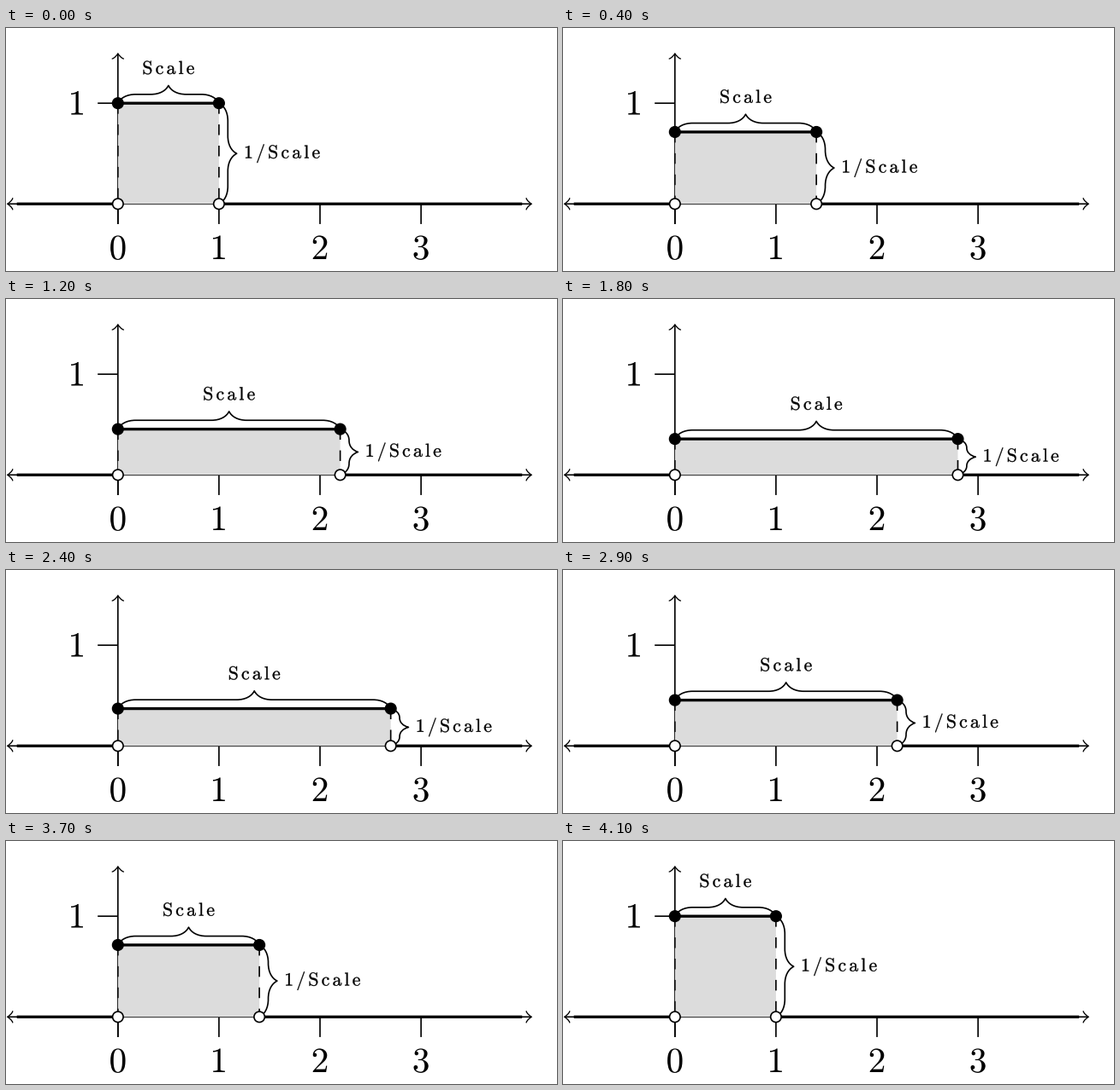
Write a matplotlib script that moves like this. It is 644 by 285 pixels and loops after 4200 ms.

```python
import matplotlib.pyplot as plt
import numpy as np
from matplotlib.animation import FuncAnimation
from matplotlib.patches import Circle, PathPatch, Rectangle
from matplotlib.path import Path
from matplotlib.textpath import TextPath
from matplotlib.transforms import Affine2D

plt.rcParams["mathtext.fontset"] = "cm"

W, H, DPI = 644, 285, 100
UNIT = 118.1                  # pixels per axis unit
PT = UNIT / 28.45             # pixels per typographic point
OX, OY = 130.8, H - 206.3     # origin, y pointing up
THIN, THICK = 0.4 * PT, 0.8 * PT
TICK = 0.2 * UNIT
AMP = 5 * PT                  # brace amplitude
STEPS = 21
FRAMES = 2 * STEPS

fig = plt.figure(figsize=(W / DPI, H / DPI), dpi=DPI, facecolor="white")
ax = fig.add_axes([0, 0, 1, 1])
ax.set_xlim(0, W)
ax.set_ylim(0, H)
ax.axis("off")


def px(width):
    """Line width in pixels to points."""
    return width * 72 / DPI


def line(xs, ys, width=THIN, z=1, **kw):
    kw.setdefault("solid_capstyle", "butt")
    return ax.plot(xs, ys, color="black", lw=px(width), zorder=z,
                   snap=False, **kw)[0]


def stroke(path, width=THIN, z=1):
    patch = PathPatch(path, fc="none", ec="black", lw=px(width), zorder=z,
                      capstyle="round", joinstyle="round", snap=False)
    return ax.add_patch(patch)


def arrow_tip(x, y, angle):
    pts = np.array([(-3, 4), (-2.75, 2.5), (0, 0.25), (0.75, 0),
                    (0, -0.25), (-2.75, -2.5), (-3, -4)], float)
    pts = (pts - (1.15, 0)) * 0.4 * PT
    path = Path(pts, [Path.MOVETO] + [Path.CURVE4] * 6)
    stroke(Affine2D().rotate_deg(angle).translate(x, y).transform_path(path),
           0.8 * THIN)


def label(text, size, center=True, weight=0.0, z=6):
    """Roman text with its baseline at y = 0, centred or left aligned on x = 0."""
    path = TextPath((0, 0), r"$\mathrm{%s}$" % text, size=size)
    box = path.get_extents()
    shift = -(box.x0 + box.x1) / 2 if center else -box.x0
    path = Affine2D().translate(shift, 0).transform_path(path)
    return ax.add_patch(PathPatch(path, fc="black", ec="black", lw=px(weight),
                                  zorder=z, snap=False))


def move(patch, x, y):
    patch.set_transform(Affine2D().translate(x, y) + ax.transData)


def tracked(word):
    return r"\hspace{0.165}".join(word)


def brace(length):
    """Points (along, out) of a curly brace and their path codes."""
    k = min(AMP, length / 4)
    mid = length / 2
    half = [(0, 0), (0.15 * k, 0.3), (0.5 * k, 0.5), (k, 0.5),
            (mid - k, 0.5), (mid - 0.5 * k, 0.5), (mid - 0.15 * k, 0.7),
            (mid, 1)]
    other = [(length - a, out) for a, out in half[-2::-1]]
    pts = np.array(half + other) * (1, AMP)
    c, l = [Path.CURVE4] * 3, [Path.LINETO]
    return pts, [Path.MOVETO] + c + l + c + c + l + c


# axes, ticks and numbers
left, right, top = OX - 1.1 * UNIT, OX + 4.1 * UNIT, OY + 1.5 * UNIT
line([left + 1.5, right - 1.5], [OY, OY])
line([OX, OX], [OY - TICK, top - 1.5])
arrow_tip(left, OY, 180)
arrow_tip(right, OY, 0)
arrow_tip(OX, top, 90)
for n in range(4):
    tick_x = OX + n * UNIT
    line([tick_x, tick_x], [OY, OY - TICK])
    move(label(str(n), 10 * PT), tick_x, H - 271.2)
line([OX - TICK, OX], [OY + UNIT, OY + UNIT])
move(label("1", 10 * PT), 83, H - 101.7)
line([OX - UNIT, OX], [OY, OY], THICK, 3)

# moving parts
area = ax.add_patch(Rectangle((OX, OY), UNIT, UNIT, fc="#dcdcdc", lw=0,
                              zorder=2, snap=False))
axis_rest = line([], [], THICK, 3)
dash = dict(ls=(0, (7.5, 7.5)), dash_capstyle="butt")
sides = [line([], [], THIN, 3, **dash) for _ in range(2)]
roof = line([], [], THICK, 4)
empty = Path(np.zeros((1, 2)))
top_brace, side_brace = stroke(empty, z=4), stroke(empty, z=4)
dots = [ax.add_patch(Circle((OX, OY), 1.5 * PT, fc=fill, ec="black",
                            lw=px(THIN), zorder=5, snap=False))
        for fill in ("white", "white", "black", "black")]
top_label = label(tracked("Scale"), 21.8, weight=0.35)
side_label = label(tracked("1/Scale"), 21.8, center=False, weight=0.35)


def update(i):
    scale = 1 + 0.1 * min(i, FRAMES - 1 - i)
    w, h = UNIT * scale, UNIT / scale
    x, y = OX + w, OY + h

    area.set_width(w)
    area.set_height(h)
    axis_rest.set_data([x, OX + 4 * UNIT], [OY, OY])
    roof.set_data([OX, x], [y, y])
    for side, sx in zip(sides, (OX, x)):
        side.set_data([sx, sx], [y, OY])
    for dot, center in zip(dots, ((OX, OY), (x, OY), (OX, y), (x, y))):
        dot.set_center(center)

    pts, codes = brace(w)
    top_brace.set_path(Path(pts + (OX, y), codes))
    pts, codes = brace(h)
    side_brace.set_path(Path(pts[:, ::-1] * (1, -1) + (x, y), codes))

    move(top_label, OX + w / 2 + 0.3, y + 34.2)
    move(side_label, x + 31, OY + h / 2 - 5.4)
    return []


anim = FuncAnimation(fig, update, frames=FRAMES, interval=100,
                     repeat=True, repeat_delay=0, blit=False)
plt.show()
```
